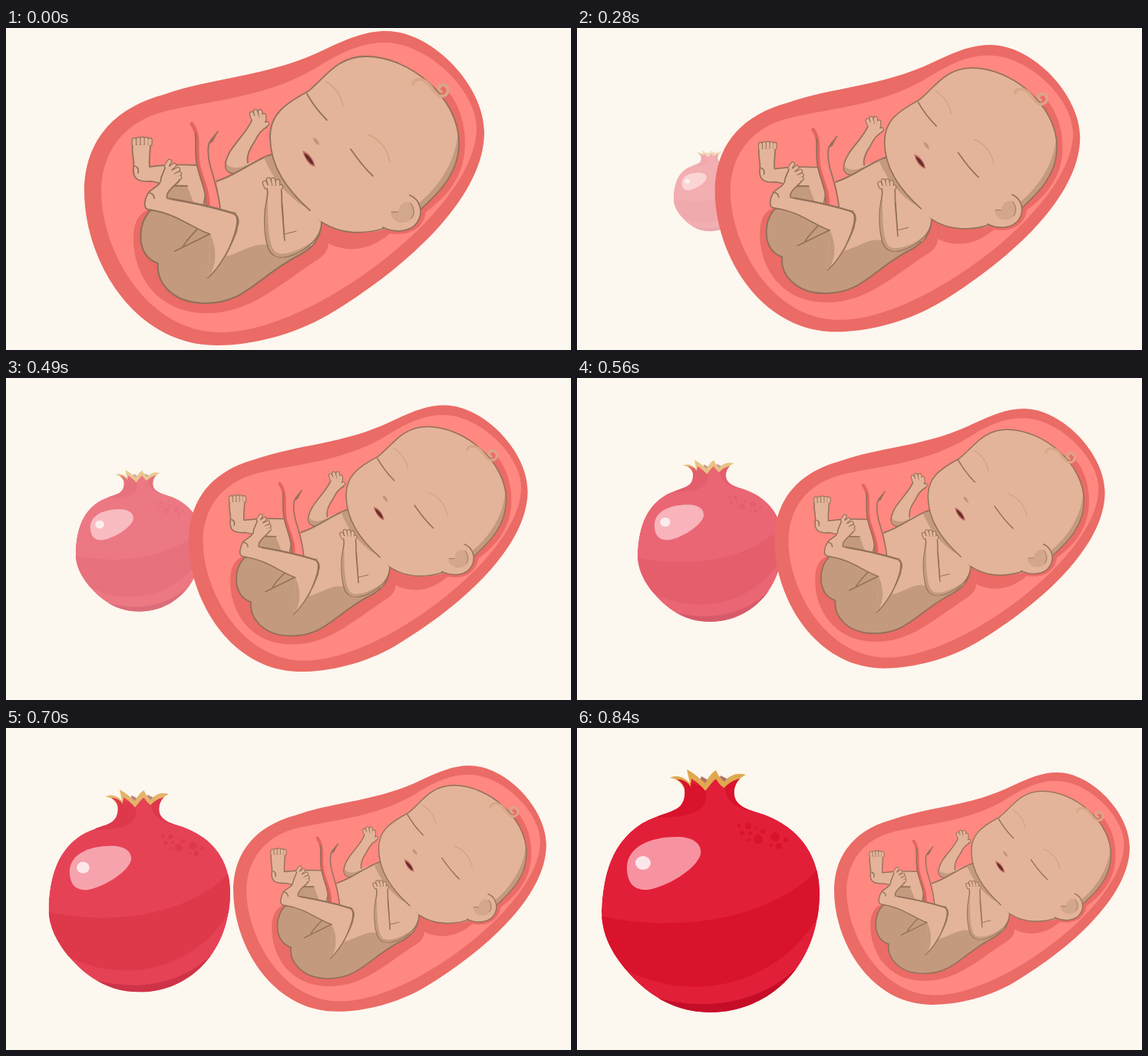
Write an HTML page that moves like this. It is 736 by 420 pixels and loops after 910 ms.

```html
<!DOCTYPE html>
<html lang="en">
<head>
<meta charset="utf-8">
<title>Growing baby and pomegranate</title>
<style>
  html, body { margin: 0; width: 100%; height: 100%; overflow: hidden; background: #fcf7ef; }
  svg { display: block; width: 736px; height: 420px; }
  path { stroke-linecap: round; stroke-linejoin: round; }
  .wall { fill: #eb6b66; }
  .fluid { fill: #ff8880; }
  .skin { fill: #e3b49a; }
  .shade { fill: #c49a7f; }
  .line { stroke: #93705a; stroke-width: 1.8; }
  .bare { fill: none; }
  .brow { fill: none; stroke: #d3a283; stroke-width: 1.5; }
  .edge { fill: none; stroke: #93705a; stroke-width: 6.6; }
  .pad { fill: none; stroke: #e3b49a; stroke-width: 4.2; }
  .deep { fill: #d9132c; }
</style>
</head>
<body>
<svg viewBox="0 0 736 420">
  <defs>
    <clipPath id="rind"><path id="fruitShape" d="M140 79C139 73 134 69 130 67C138 67 144 70 148 77L149 66C157 70 163 77 167 82C172 76 176 70 181 66C184 71 188 76 192 78C198 71 205 68 212 66C204 75 203 86 207 94C211 101 220 106 232 109C285 124 316 162 316 215C316 310 250 371 174 371C118 371 78 338 52 300C38 279 32 260 32 238C34 190 46 150 82 126C100 114 124 111 133 103C140 97 141 87 140 79Z"/></clipPath>
  </defs>
  <g id="fruit"></g>
  <g id="womb"></g>
</svg>
<script>
const LOOP = 910, STEP = 70, LAST = 12;
const byId = id => document.getElementById(id);
const path = (cls, d, extra = '') => `<path class="${cls}" d="${d}" ${extra}/>`;
const limb = (body, digits) =>
  path('edge', digits) + path('skin line', body) + path('pad', digits);

const seeds = [[211,127,2.5], [223,128,4], [234,130,1.5], [242,135,3], [215,137,3], [226,137,2.5],
  [236,145,6], [258,142,6], [272,146,3], [224,146,2], [253,153,2], [263,154,4]];

byId('fruit').innerHTML =
  path('', 'M158 74L162 63L171 68L167 78ZM183 72L187 62L197 67L192 77Z', 'fill="#b0706a"') +
  path('', 'M121 65C131 60 141 65 147 72L143 54C153 59 161 67 167 72C171 64 176 58 181 55C184 62 188 67 192 70C200 60 210 58 220 61C212 65 207 71 205 78L167 84L140 80C136 71 130 66 121 65Z', 'fill="#e0a850"') +
  `<g clip-path="url(#rind)">` +
  path('', byId('fruitShape').getAttribute('d'), 'fill="#e21f38"') +
  path('deep', 'M120 60L167 78C174 104 158 117 105 117ZM192 72C192 92 202 103 228 109L230 60Z') +
  path('deep', 'M30 245C130 268 255 250 316 182L318 238C276 322 168 366 66 317L28 290Z') +
  path('', 'M100 351C170 371 245 359 294 305L300 380H100Z', 'fill="#c50d28"') +
  '</g>' +
  path('', 'M65 181C66 155 95 142 130 142C150 142 163 150 161 165C155 185 115 208 92 211C72 212 65 200 65 181Z', 'fill="#f793a1"') +
  '<ellipse cx="86" cy="176" rx="10" ry="9" fill="#fde6ea"/>' +
  seeds.map(([x, y, r]) => `<circle class="deep" cx="${x}" cy="${y}" r="${r}"/>`).join('');

const sac =
  path('wall', 'M495 4C555 4 623 75 623 136C623 217 531 307 420 374C372 402 316 414 275 414C166 414 102 302 102 213C102 160 128 108 205 87C270 64 340 64 413 29C445 14 468 4 495 4Z') +
  path('fluid', 'M493 19C550 19 613 82 613 130C613 205 510 302 409 357C364 381 318 397 280 397C182 397 124 288 124 213C124 166 150 122 210 108C275 93 345 90 412 47C440 30 465 19 493 19Z') +
  path('wall', 'M200 235C175 235 166 250 166 275C166 320 195 372 262 372C315 372 350 340 400 306C415 297 419 292 420 281C440 291 470 294 500 268C525 272 544 262 547 240C580 216 598 188 598 150C598 120 588 95 570 76L400 200Z');

const farArm =
  limb('M346 165C335 169 325 177 312 186C297 193 284 190 286 176C290 155 312 140 320 121L322 113L337 119L340 129C332 133 328 139 324 148C317 158 313 168 315 176',
    'M322 118L320 112M327 116L325 109M332 117L331 109M336 120L336 114M337 126L340 125') +
  path('shade', 'M287 177C293 184 304 184 314 178L312 185C299 191 286 189 287 177Z');

const body =
  path('shade line', 'M188 238C177 250 174 265 176 280C179 297 189 304 198 307C195 330 215 359 260 359C310 359 325 328 375 300C400 288 410 275 411 253L372 212L345 165C320 174 300 192 274 200L260 236Z', 'style="stroke-width:2.2"') +
  path('skin', 'M344 167C320 176 300 193 275 201L262 237L300 240L302 265L287 298C310 291 326 278 342 284L398 284C408 272 410 262 410 253L380 212Z') +
  path('shade', 'M336 169L347 166L396 237C374 226 350 203 336 169Z');

const farLeg =
  limb('M262 209L235 206C220 206 205 204 190 200C172 201 165 197 166 183C168 172 163 165 165 152L188 151C188 163 186 170 187 181C210 178 230 178 250 179',
    'M167 152V146M172.3 151V145M177.6 151V144.5M182.8 151V145M187.5 151V146') +
  path('skin', 'M235 206L247 182L264 210L261 237L246 232Z') +
  path('shade', 'M207 207L236 206L246 232L207 224Z') +
  path('line bare', 'M207 206H236M250 179L262 207L257 232M168 180C172 181 173 185 172 189');

const cord =
  path('fluid', 'M243 124C253 141 246 160 251 181C256 201 263 213 262 234L279 237C278 214 274 199 269 184C263 164 266 151 276 135Z') +
  path('bare', 'M242 125C254 141 246 162 251 181C256 201 264 213 263 233', 'stroke="#e26560" stroke-width="5"') +
  path('line bare', 'M247 138C248 155 245 167 250 183C253 198 262 214 260 233M276 135C271 142 266 146 264 152C262 164 265 178 269 190C274 207 278 221 279 237') +
  path('line', 'M274 138C269 142 266 147 264 151L269 148Z', 'fill="#93705a" style="stroke-width:1"');

const nearLeg =
  path('line bare', 'M220 291L267 268M231 284C240 270 250 262 257 255') +
  limb('M263 326C275 315 285 300 294 280C302 262 306 248 297 242C275 235 245 228 210 222C207 215 218 207 226 199L211 177C205 184 205 190 202 195C203 205 192 208 186 214C181 222 177 237 187 237C225 243 240 260 266 269',
    'M209 180L213 174M214 183L219 179M217 188L224 184.5M219 193L226 190M220 197L226 195') +
  path('shade', 'M266 269C276 290 274 312 263 326Z') +
  path('line bare', 'M187 215C191 216 193 219 193 222M300 245C304 254 298 270 292 284') +
  path('line bare', 'M215 223C250 229 278 236 297 242C302 245 303 250 302 256', 'style="stroke-width:2.5"');

const nearArm =
  limb('M411 253C411 270 400 283 380 293C363 302 347 301 342 288C337 274 335 248 339 228C341 217 342 212 338 204L357 205C361 214 358 222 360 240L363 277',
    'M339 207L337 202M344 204L342 198M349 204L348 198M354 205L354 200M356 210L358 207') +
  path('skin', 'M362 240L410 253C408 272 390 283 364 288Z') +
  path('shade', 'M341 222C341 260 342 285 352 293C365 298 385 289 402 276C390 289 374 297 360 299C344 299 341 286 338 267C336 250 338 233 341 222Z') +
  path('line bare', 'M360 230L363 277M362 269L378 265', 'style="stroke-width:1.2"');

const head =
  path('skin', 'M344 142C344 114 361 100 393 83C415 66 430 37 469 37C525 37 590 90 590 150C590 195 555 222 541 236L520 250C500 264 480 267 458 267C435 266 421 261 411 253L396 238C365 210 344 180 344 142Z') +
  path('shade', 'M589 132C588 168 568 204 536 230L541 236C568 212 588 190 590 153Z') +
  path('line bare', 'M396 238C365 210 344 180 344 142C344 114 361 100 393 83C415 66 430 37 469 37C525 37 590 90 590 150C590 195 555 222 541 236M411 253C435 269 465 270 494 261') +
  path('skin line', 'M526 218C540 224 544 241 536 253C528 266 507 268 491 260') +
  path('', 'M511 239C512 228 524 222 530 232C536 245 528 255 514 254C505 252 500 245 502 240Z', 'fill="#d3a78c"') +
  path('line bare', 'M527 228C533 236 532 244 528 248M502 240L510 240', 'style="stroke-width:1"') +
  path('brow', 'M417 70C430 78 437 90 439 102M471 139C485 143 497 158 500 174') +
  path('brow', 'M530 73C533 65 541 66 547 70C556 76 558 88 567 89C577 89 579 76 570 74C563 73 561 81 567 83', 'style="stroke:#d9a688;stroke-width:4"') +
  path('line bare', 'M392 86C400 100 408 110 418 120M449 158C458 171 467 183 478 193') +
  path('', 'M400 143C405 143 408 149 408 153C404 152 400 148 400 143Z', 'fill="#c4957c"') +
  path('', 'M386 160C394 161 401 171 403 181C396 181 389 172 386 160Z', 'fill="#c9776c"') +
  path('', 'M388 163C394 165 400 172 401 179C396 177 390 170 388 163Z', 'fill="#682c2d"');

byId('womb').innerHTML = sac + farArm + body + farLeg + cord + nearLeg + nearArm + head;

function draw() {
  const p = Math.floor(performance.now() % LOOP / STEP) / LAST;
  byId('womb').setAttribute('transform', `translate(${259.6 * p} ${55 * p}) scale(${1 - 0.261 * p})`);
  byId('fruit').setAttribute('transform', `translate(172.5 212) scale(${p}) translate(-172.5 -212)`);
  byId('fruit').setAttribute('opacity', p);
  requestAnimationFrame(draw);
}
draw();
</script>
</body>
</html>
```
